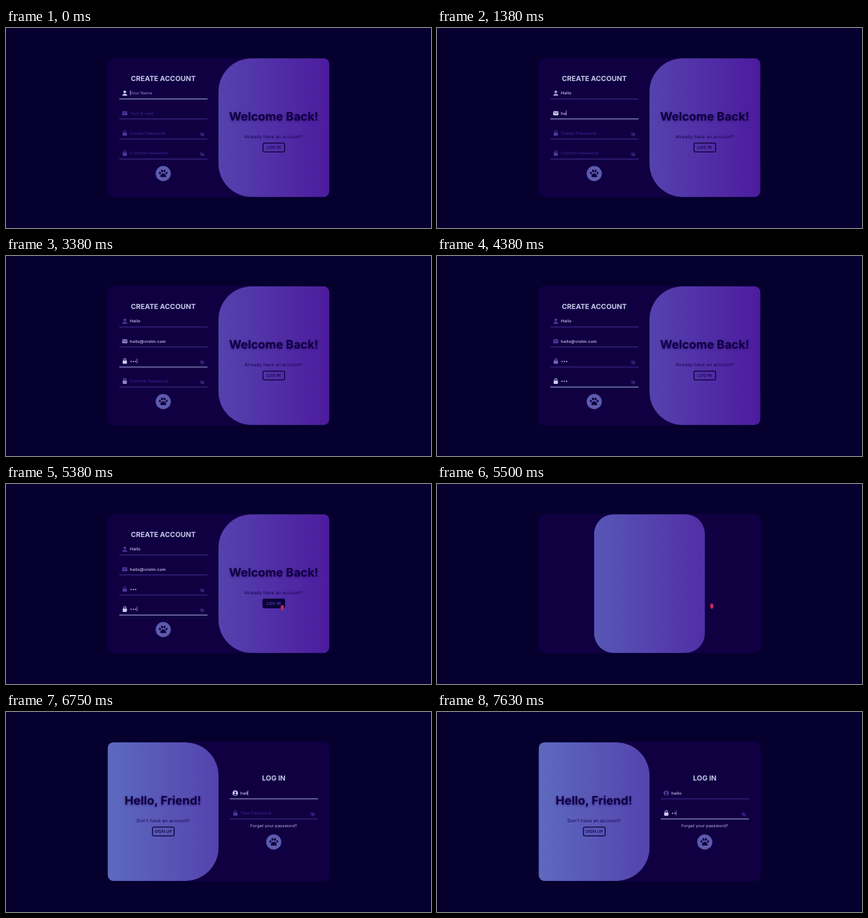
Animation of 600x283 px, one loop 7.76 s. Source, as an HTML page:

```html
<!DOCTYPE html>
<html lang="en">
<head>
<meta charset="utf-8">
<title>Account form</title>
<style>
  html, body { margin: 0; width: 100%; height: 100%; overflow: hidden; background: #05002e; }
  svg { display: block; width: 100vw; height: 100vh; }
  text {
    font: 500 5.8px Inter, "Open Sans", sans-serif;
    letter-spacing: .15px;
    text-rendering: geometricPrecision;
    white-space: pre;
  }
  .mid { text-anchor: middle; }
  .title { font-size: 9.9px; font-weight: 700; letter-spacing: 0; fill: #c5cae9; }
  .big { font-size: 16.7px; font-weight: 700; letter-spacing: 0; fill: #10003f; filter: drop-shadow(0 1px 1.6px #2a0a78aa); }
  .sub { font-size: 6.3px; font-weight: 400; letter-spacing: .24px; fill: #150048; }
  .btn rect { fill: transparent; stroke: #0d0038; stroke-width: 1.3; }
  .btn text { fill: #10003f; }
  .btn.hover rect { fill: #0a0038; stroke: #0a0038; }
  .btn.hover text { fill: #5b49b4; }
  .link { fill: #c0bdea; font-weight: 400; }
</style>
</head>
<body>
<svg viewBox="0 0 600 283" preserveAspectRatio="none">
  <defs>
    <linearGradient id="fill" gradientUnits="userSpaceOnUse" x1="143" y1="0" x2="457" y2="0">
      <stop stop-color="#5c6abe"/><stop offset="1" stop-color="#4d1b9e"/>
    </linearGradient>
    <clipPath id="clip"><path id="clipShape"/></clipPath>
    <g id="user">
      <circle cy="-1.9" r="1.9"/>
      <path d="M-3.5 3.5C-3.5-.2 3.5-.2 3.5 3.5Z"/>
    </g>
    <g id="mail">
      <rect x="-3.7" y="-2.8" width="7.4" height="5.8" rx=".8"/>
      <path d="M-3.1-1.7L0 .5 3.1-1.7" fill="none" stroke="#10003f" stroke-width=".8"/>
    </g>
    <g id="lock">
      <rect x="-3" y="-.9" width="6" height="4.6" rx=".8"/>
      <path d="M-1.7-.6V-2a1.7 1.7 0 0 1 3.4 0V-.6" fill="none" stroke="currentColor" stroke-width="1"/>
    </g>
    <g id="badge">
      <circle r="3.8"/>
      <g fill="#10003f"><circle cy="-1.1" r="1.2"/><path d="M-2.2 2.4C-1.8.2 1.8.2 2.2 2.4 1 3.4-1 3.4-2.2 2.4Z"/></g>
    </g>
    <g id="eye" fill="none" stroke="#44339a" stroke-width=".8">
      <path d="M-3.1 0Q0-3.8 3.1 0 0 3.8-3.1 0Z"/>
      <circle r=".9"/>
      <path d="M-2.8-2.6L2.8 2.6"/>
    </g>
    <g id="paw">
      <circle r="10.7" fill="#5d5bad"/>
      <g fill="#10003f">
        <ellipse cx="-4.7" cy="-.8" rx="1.3" ry="1.8" transform="rotate(-20 -4.7 -.8)"/>
        <ellipse cx="-1.8" cy="-3.7" rx="1.4" ry="2"/>
        <ellipse cx="1.8" cy="-3.7" rx="1.4" ry="2"/>
        <ellipse cx="4.7" cy="-.8" rx="1.3" ry="1.8" transform="rotate(20 4.7 -.8)"/>
        <path d="M0-.6C2.2-.6 4.2 2.4 4.2 3.8 4.2 5.7 1.9 4.7 0 4.7S-4.2 5.7-4.2 3.8C-4.2 2.4-2.2-.6 0-.6Z"/>
      </g>
    </g>
  </defs>

  <rect width="600" height="283" fill="#05002e"/>
  <rect x="142.7" y="42.2" width="314.6" height="197.6" rx="10" fill="#100042"/>

  <g id="signup">
    <text class="title mid" x="222" y="75">CREATE ACCOUNT</text>
    <use href="#paw" x="222" y="206"/>
  </g>
  <g id="login">
    <text class="title mid" x="378" y="97.3">LOG IN</text>
    <text class="link mid" x="378" y="163.3">Forget your password?</text>
    <rect id="under" x="346.5" y="164.2" width="63.5" height=".6" fill="#c0bdea"/>
    <use href="#paw" x="378" y="184"/>
  </g>

  <path id="panel" fill="url(#fill)"/>
  <g clip-path="url(#clip)">
    <g id="back">
      <text class="big mid" x="378" y="131">Welcome Back!</text>
      <text class="sub mid" x="378" y="156">Already have an account?</text>
      <g class="btn" id="toLogin">
        <rect x="362.8" y="162.8" width="30.6" height="12.6" rx="1.8"/>
        <text class="mid" x="378" y="171.3">LOG IN</text>
      </g>
    </g>
    <g id="hello">
      <text class="big mid" x="221.6" y="131">Hello, Friend!</text>
      <text class="sub mid" x="221.8" y="156">Don't have an account?</text>
      <g class="btn">
        <rect x="206.8" y="162.8" width="30.6" height="12.6" rx="1.8"/>
        <text class="mid" x="222" y="171.3">SIGN UP</text>
      </g>
    </g>
  </g>
  <ellipse id="pointer" rx="2.3" ry="3.7" fill="#c02a5c"/>
</svg>

<script>
const LOOP = 7760, TICK = 125, LAST = 61, SHIFT = 156.3;
const DIM = [74, 58, 154], LIT = [208, 206, 246];
const $ = id => document.getElementById(id);

function add(parent, tag, attrs) {
  const el = document.createElementNS("http://www.w3.org/2000/svg", tag);
  for (const k in attrs) el.setAttribute(k, attrs[k]);
  return parent.appendChild(el);
}
const mix = (a, b, k) => `rgb(${a.map((v, i) => Math.round(v + (b[i] - v) * k))})`;
const show = (el, on) => el.setAttribute("visibility", on ? "inherit" : "hidden");
const move = (el, x, y = 0) => el.setAttribute("transform", `translate(${x} ${y})`);

// Times are in ticks: on/off = focus and blur, keys = when each character lands.
const emailKeys = Array.from({ length: 15 }, (_, i) => i < 2 ? 10 + i : 11 + Math.ceil((i - 1) / 1.4));
const fields = [
  { form: "signup", x: 160, y: 100.4, icon: "user", hint: "Your Name", text: "Hello", on: 0, off: 8, fade: 10, keys: [2, 3, 4, 5, 6] },
  { form: "signup", x: 160, y: 128.7, icon: "mail", hint: "Your E-mail", text: "hello@vrolm.com", on: 8, off: 22, fade: 10, keys: emailKeys },
  { form: "signup", x: 160, y: 157.1, icon: "lock", hint: "Create Password", text: "•••", on: 22, off: 28, fade: 10, keys: [24, 25, 26], eye: true },
  { form: "signup", x: 160, y: 185.4, icon: "lock", hint: "Confirm Password", text: "•••", on: 28, off: 99, fade: 10, keys: [31, 32, 33], eye: true },
  { form: "login", x: 316, y: 122.9, icon: "badge", hint: "Your E-mail", text: "hello", on: 48, off: 58, fade: 3, keys: [50, 52, 53, 54, 55] },
  { form: "login", x: 316, y: 151.3, icon: "lock", hint: "Your Password", text: "••", on: 58, off: 99, fade: 3, keys: [60, 61], eye: true }
];

for (const f of fields) {
  const g = add($(f.form), "g", {});
  move(g, f.x, f.y);
  f.line = add(g, "rect", { y: -.5, width: 124.5, height: 1 });
  f.mark = add(g, "use", { href: "#" + f.icon, x: 7.7, y: -8.2 });
  f.label = add(g, "text", { x: 15, y: -6 });
  f.caret = add(g, "rect", { y: -12, width: .6, height: 7, fill: "#c9c6f2" });
  if (f.eye) add(g, "use", { href: "#eye", x: 117, y: -6.6 });
}

function drawField(f, n) {
  const focused = n >= f.on && n < f.off;
  const count = f.keys.filter(k => k <= n).length;
  const lit = focused ? 1 : n >= f.off ? Math.max(0, 1 - (n - f.off) / f.fade) : n === f.on - 1 ? .5 : 0;
  const tone = mix(DIM, LIT, lit);
  f.mark.setAttribute("fill", tone);
  f.mark.setAttribute("color", tone);
  f.line.setAttribute("fill", focused ? "#a9a5df" : "#402e90");
  f.label.textContent = count ? f.text.slice(0, count) : f.hint;
  f.label.setAttribute("fill", count ? "#d0cdf6" : focused ? "#8078cc" : "#38238c");
  const rest = n - (count ? f.keys[count - 1] : f.on);
  show(f.caret, focused && rest % 5 < 2);
  if (focused) f.caret.setAttribute("x", 15 + (count ? f.label.getComputedTextLength() : 0));
}

function panelPath(p) {
  const l = 300 - SHIFT * p, r = l + SHIFT, t = 43, b = 239;
  const a = 47 - 39 * p, c = 8 + 39 * p;
  return `M${l + a} ${t}H${r - c}A${c} ${c} 0 0 1 ${r} ${t + c}V${b - c}A${c} ${c} 0 0 1 ${r - c} ${b}` +
    `H${l + a}A${a} ${a} 0 0 1 ${l} ${b - a}V${t + a}A${a} ${a} 0 0 1 ${l + a} ${t}Z`;
}

// Pointer stops: tick, x, y
const stops = [[39, 236, 200], [42, 390, 175], [43, 390, 175], [45, 386, 170.5], [47, 350, 119]];
function drawPointer(n) {
  const i = stops.findIndex((s, k) => k && n <= s[0]);
  const on = i > 0 && n >= stops[0][0];
  show($("pointer"), on);
  if (!on) return;
  const [t0, x0, y0] = stops[i - 1], [t1, x1, y1] = stops[i];
  const k = (n - t0) / (t1 - t0);
  move($("pointer"), x0 + (x1 - x0) * k, y0 + (y1 - y0) * k);
}

function draw(n) {
  const p = Math.min(1, Math.max(0, (n - 43) / 2));
  for (const f of fields) drawField(f, n);
  for (const id of ["panel", "clipShape"]) $(id).setAttribute("d", panelPath(p));
  move($("signup"), SHIFT * p);
  move($("login"), SHIFT * (p - 1));
  show($("signup"), p <= .5);
  show($("login"), p > .5);
  move($("back"), 2 * SHIFT * p);
  move($("hello"), 2 * SHIFT * (p - 1));
  $("toLogin").classList.toggle("hover", n === 42 || n === 43);
  show($("under"), n === 45);
  drawPointer(n);
}

const start = performance.now();
let shown = -1;
function tick() {
  const t = (performance.now() - start) % LOOP;
  const n = Math.min(LAST, Math.floor(t / TICK));
  if (n !== shown) draw(shown = n);
  requestAnimationFrame(tick);
}
tick();
</script>
</body>
</html>
```
